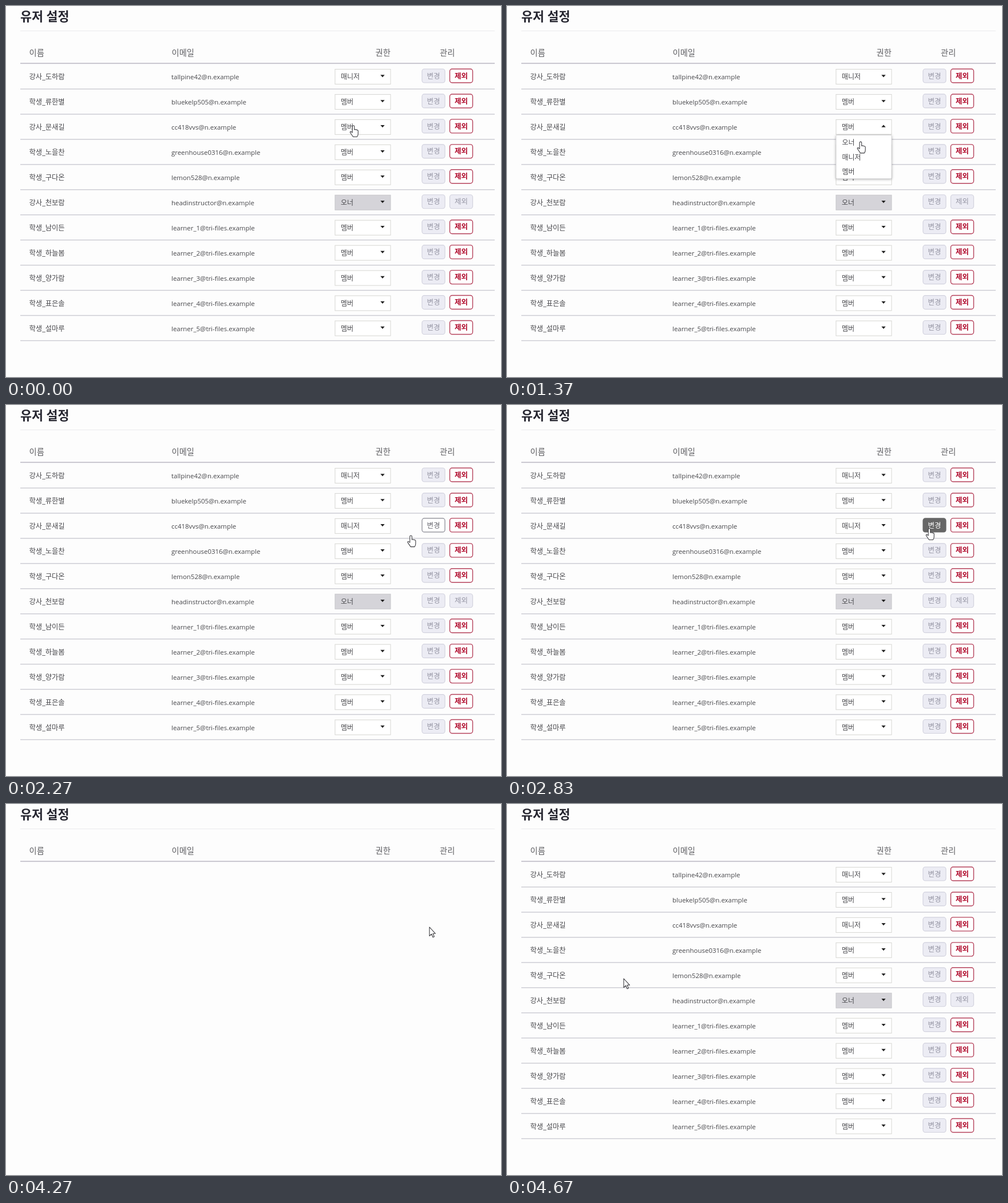
An HTML page for the animation above (4700 ms loop, 865 by 648 pixels).

```html
<!DOCTYPE html>
<html lang="ko">
<head>
<meta charset="utf-8">
<title>유저 설정</title>
<style>
  html, body { margin: 0; width: 100%; height: 100%; overflow: hidden; background: #fdfdfd; }
  svg { display: block; width: 865px; height: 648px; }
  text { font-family: "Open Sans", "Noto Sans CJK KR", "Noto Sans CJK", sans-serif; fill: #48484c; }
  .title { font-size: 21.7px; font-weight: 700; fill: #25252f; }
  .head { font-size: 14.3px; font-weight: 500; fill: #5e5e62; }
  .name { font-size: 12.3px; }
  .mail { font-size: 11.45px; }
  .pick { font-size: 12px; }
  .btn text { font-size: 12.5px; text-anchor: middle; }
  .btn rect { stroke-width: 1.2; }
  .off rect { fill: #ececf4; stroke: #d2d2de; }
  .off text { fill: #9696a4; }
  .red rect { fill: #fff; stroke: #b5405a; stroke-width: 1.4; }
  .red text { fill: #b00a2c; font-weight: 700; }
  .on rect { fill: #fff; stroke: #85858f; }
  .on text { fill: #66666e; }
  .hover rect { fill: #666; stroke: #666; }
  .hover text { fill: #fff; font-weight: 500; }
  #menu rect { fill: #fff; stroke: #d8d8da; filter: drop-shadow(0 1px 2px rgba(0,0,0,.3)); }
  #hand, #arrow { fill: #fff; stroke: #3c3c40; stroke-width: 1.1; stroke-linejoin: round; }
</style>
</head>
<body>
<svg viewBox="0 0 865 648">
  <text class="title" x="25" y="26">유저 설정</text>
  <rect x="25" y="43" width="829" height="1" fill="#ebebed"/>
  <g id="heads"></g>
  <rect x="25" y="99.3" width="829" height="1.8" fill="#c3c1cb"/>
  <g id="rows"></g>
  <g id="menu">
    <rect x="575" y="225.5" width="97" height="76" rx="2"/>
  </g>
  <path id="hand" d="M-1.8 1.6a1.8 1.8 0 0 1 3.6 0V7q1.2-.9 2.3.1q1.4-.7 2.3.6q1.6-.3 1.9 1.2V14q0 3.2-1.9 5.5H-.4L-5.4 12.2q-.8-1.9 1-2L-1.8 12Z"/>
  <path id="arrow" d="M2-1v15.5l3.6-3.3 2.4 5.6 2.4-1-2.4-5.5h4.4z"/>
</svg>
<script>
const LOOP = 4700, PITCH = 43.95, TARGET = 2, OWNER = 5;
const OPEN = 1030, CHOOSE = 1870, HOVER = 2300, SAVE = 3200, CLEAR = 4200, RELOAD = 4370;
const $ = id => document.getElementById(id);

function add(parent, tag, attrs, label) {
  const el = document.createElementNS("http://www.w3.org/2000/svg", tag);
  for (const k in attrs) el.setAttribute(k, attrs[k]);
  if (label) el.textContent = label;
  return parent.appendChild(el);
}

const people = [
  ["강사_도하람", "tallpine42@n.example"],
  ["학생_류한별", "bluekelp505@n.example"],
  ["강사_문새길", "cc418vvs@n.example"],
  ["학생_노을찬", "greenhouse0316@n.example"],
  ["학생_구다온", "lemon528@n.example"],
  ["강사_천보람", "headinstructor@n.example"],
  ...["남이든", "하늘봄", "양가람", "표은솔", "설마루"].map(
    (name, i) => ["학생_" + name, `learner_${i + 1}@tri-files.example`])
];

function button(parent, x, y, label, look) {
  const g = add(parent, "g", { class: "btn " + look });
  add(g, "rect", { x, y: y - 12, width: 40, height: 24, rx: 4 });
  add(g, "text", { x: x + 20, y: y + 4.6 }, label);
  return g;
}

function drawRow([name, mail], i) {
  const g = $("rows"), y = 122 + i * PITCH, owner = i === OWNER;
  add(g, "text", { class: "name", x: 40.5, y: y + 6.3 }, name);
  add(g, "text", { class: "mail", x: 289, y: y + 6 }, mail);
  add(g, "rect", {
    x: 575, y: y - 11.5, width: 97, height: 26,
    fill: owner ? "#d5d4d9" : "#fff", stroke: owner ? "#c6c6ca" : "#d6d6d2"
  });
  const role = add(g, "text", { class: "pick", x: 585, y: y + 6 },
    owner ? "오너" : i ? "멤버" : "매니저");
  const caret = add(g, "path", { d: `M654.3 ${y - 1.8}h7.4l-3.7 4.2z`, fill: "#222" });
  const save = button(g, 727, y, "변경", "off");
  button(g, 775.5, y, "제외", owner ? "off" : "red");
  add(g, "rect", { x: 25, y: y + 22.3, width: 829, height: 1.4, fill: "#cacad2" });
  return { role, caret, save, y };
}

function drawHead(x, label) {
  add($("heads"), "text", { class: "head", x, y: 87.3 }, label);
}
drawHead(40.5, "이름");
drawHead(289.5, "이메일");
drawHead(645.5, "권한");
drawHead(758, "관리");
const row = people.map(drawRow)[TARGET];
["오너", "매니저", "멤버"].forEach((label, i) =>
  add($("menu"), "text", { class: "pick", x: 585.5, y: 243 + i * 25.6 }, label));

const progress = (t, from, to) => Math.min(1, Math.max(0, (t - from) / (to - from)));
const ease = p => p * p * (3 - 2 * p);

// The pointer glides from stop to stop
const start = { x: 607, y: 209 };
const glides = [
  { from: 30, to: 400, x: 601, y: 221 },
  { from: 670, to: 770, x: 621, y: 208 },
  { from: 1060, to: 1670, x: 615, y: 265 },
  { from: 1940, to: 2430, x: 738, y: 216 },
  { from: 4290, to: 4670, x: 202, y: 306 }
];
const pointer = t => glides.reduce((at, g) => {
  const p = ease(progress(t, g.from, g.to));
  return { x: at.x + (g.x - at.x) * p, y: at.y + (g.y - at.y) * p };
}, start);

// Half a turn while opening, and back while closing
const caretAngle = t =>
  180 * (progress(t, OPEN - 60, OPEN + 60) * (t >= OPEN) - progress(t, CHOOSE, CHOOSE + 80));

function saveLook(t) {
  if (t < CHOOSE || t >= CLEAR) return "off";
  return t < HOVER ? "on" : "hover";
}

const show = (id, on) => $(id).setAttribute("visibility", on ? "visible" : "hidden");

function draw(t) {
  const { x, y } = pointer(t);
  for (const id of ["hand", "arrow"]) {
    show(id, (id === "hand") === (t < SAVE));
    $(id).setAttribute("transform", `translate(${x} ${y})`);
  }
  show("menu", t >= OPEN && t < CHOOSE);
  show("rows", t < CLEAR || t >= RELOAD);
  row.role.textContent = t < CHOOSE ? "멤버" : "매니저";
  row.caret.setAttribute("transform", `rotate(${caretAngle(t)} 658 ${row.y})`);
  row.save.setAttribute("class", "btn " + saveLook(t));
}

function tick() {
  draw(performance.now() % LOOP);
  requestAnimationFrame(tick);
}
tick();
</script>
</body>
</html>
```
